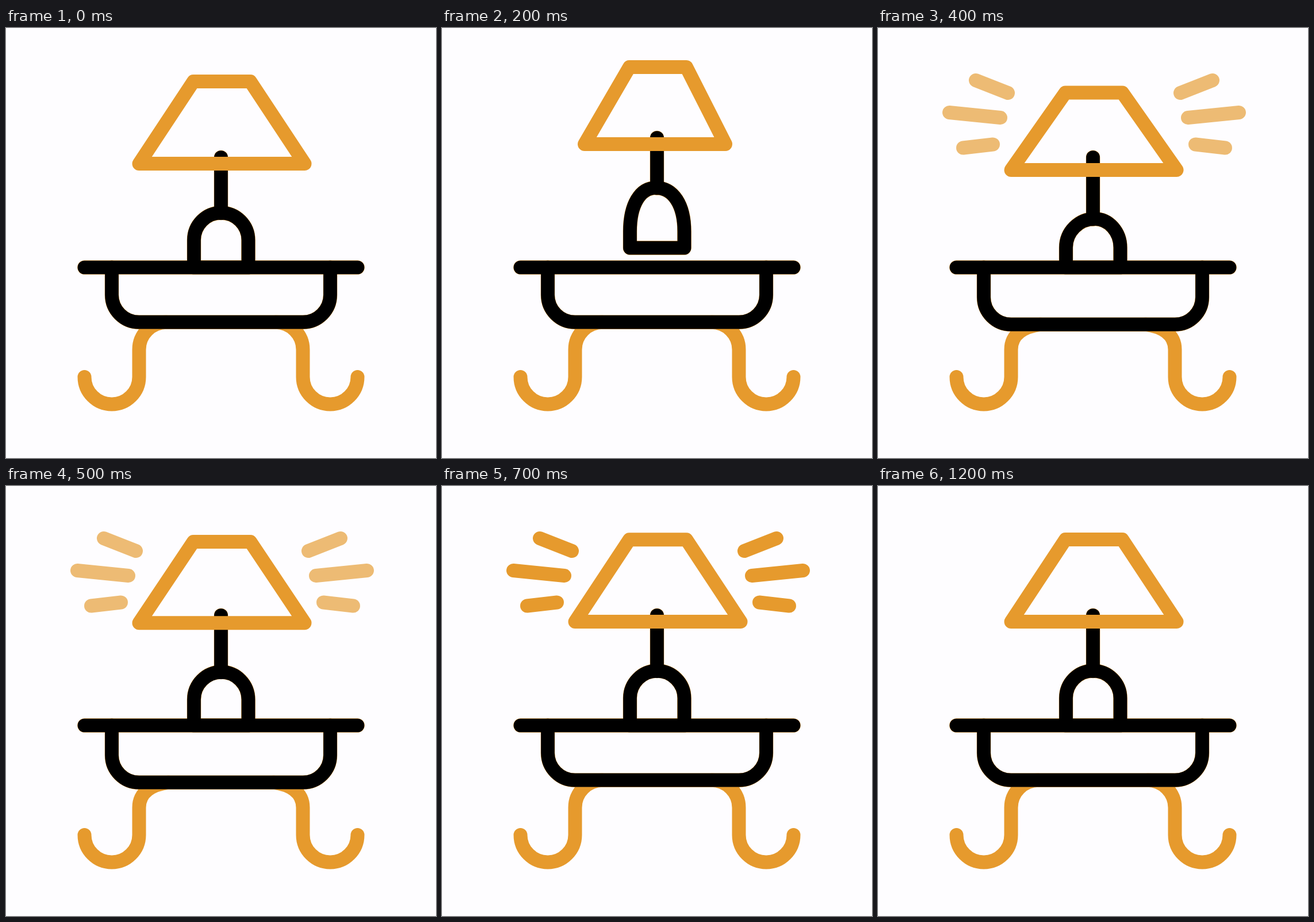
An HTML page with a canvas for the animation above (1300 ms loop, 748x748 px).

```html
<!DOCTYPE html>
<html lang="en">
<head>
<meta charset="utf-8">
<title>Hopping lamp</title>
<style>
  html, body { margin: 0; width: 100%; height: 100%; overflow: hidden; background: #fefdff; }
  canvas { display: block; }
</style>
</head>
<body>
<canvas id="stage" width="748" height="748"></canvas>
<script>
const ctx = document.getElementById('stage').getContext('2d');
const SIZE = 748, STEP = 100, LOOP = 1300;
const LAND = 400, BRIGHT = 700, OFF = 1200;
const ORANGE = '#e69a2d', BLACK = '#000', PAPER = '#fefdff';
const LINE = 24, RADIUS = 47.5;
const TABLE = 416.5, TRAY = 511.7;

// Inner and outer end of each ray on the left
const rays = [[226, 113, 170, 91], [213, 156, 124, 147], [200, 202.5, 148, 208.5]];

function stroke(d, color, width = LINE) {
  ctx.strokeStyle = color;
  ctx.lineWidth = width;
  ctx.stroke(new Path2D(d));
}

// Black lines with one shared hairline orange rim
function ink(...paths) {
  for (const d of paths) stroke(d, ORANGE, LINE + 0.5);
  for (const d of paths) stroke(d, BLACK, LINE - 0.3);
}

function drawLegs(sag) {
  const r = RADIUS, k = r * 0.552, foot = 607, knee = 559.5, left = 136.5;
  for (const x of [n => left + n, n => SIZE - left - n]) {
    stroke(`M${x(0)} ${foot}
      C${x(0)} ${foot + k} ${x(r - k)} ${foot + r} ${x(r)} ${foot + r}
      S${x(2 * r)} ${foot + k} ${x(2 * r)} ${foot}V${knee}
      C${x(2 * r)} ${knee - k} ${x(3 * r - k)} ${TRAY + 2 * sag} ${x(3 * r + sag)} ${TRAY + sag}`, ORANGE);
  }
}

function trayPath(sag) {
  const arc = `A${RADIUS} ${RADIUS} 0 0 0`, y = TRAY + sag;
  return `M184 ${TABLE}V${y - RADIUS}${arc} 231.5 ${y}H516.5${arc} 564 ${y - RADIUS}V${TABLE}`;
}

function domePath(hop, squash) {
  const l = 327, r = 421.5, k = 0.552 + 0.06 * hop;
  const base = TABLE - 34 * hop;
  const apex = 374 - 2 * hop + 3 * squash;
  const top = 321.5 - 43.5 * hop + 10.5 * squash;
  const shoulder = 369 - 15 * hop + 13 * squash;
  const cy = shoulder + (top - shoulder) * k;
  return `M${l} ${base}V${shoulder}
    C${l} ${cy} ${apex + (l - apex) * k} ${top} ${apex} ${top}
    C${apex + (r - apex) * k} ${top} ${r} ${cy} ${r} ${shoulder}V${base}Z`;
}

function drawShade(hop, squash) {
  const top = 93 - 25 * hop + 19.5 * squash;
  const bottom = 236 - 34 * hop + 11 * squash;
  const left = 231.5 + 16.5 * hop, right = 519.5 - 26.5 * hop;
  stroke(`M326 ${top}H425L${right} ${bottom}H${left}Z`, ORANGE);
}

function drawRays(glow) {
  ctx.globalAlpha = glow;
  for (const [x1, y1, x2, y2] of rays) {
    for (const x of [n => n, n => 752 - n]) stroke(`M${x(x1)} ${y1}L${x(x2)} ${y2}`, ORANGE);
  }
  ctx.globalAlpha = 1;
}

function draw(now) {
  const t = Math.floor(now % LOOP / STEP) * STEP;
  const hop = t < LAND ? Math.sin(Math.PI * t / LAND) : 0;
  const squash = t < LAND ? 0 : 0.2 ** ((t - LAND) / STEP);
  const dim = t >= LAND && t < BRIGHT;
  const sag = dim ? 4 : 0;

  ctx.fillStyle = PAPER;
  ctx.fillRect(0, 0, SIZE, SIZE);
  ctx.lineCap = ctx.lineJoin = 'round';
  drawLegs(sag);
  ink(`M136.5 ${TABLE}H611.5`, trayPath(sag), domePath(hop, squash),
    `M374 ${225 - 34 * hop}V${322 - 43.5 * hop + 10.5 * squash}`);
  drawShade(hop, squash);
  drawRays(dim ? 0.66 : t >= BRIGHT && t < OFF ? 1 : 0);
  requestAnimationFrame(draw);
}
draw(performance.now());
</script>
</body>
</html>
```
